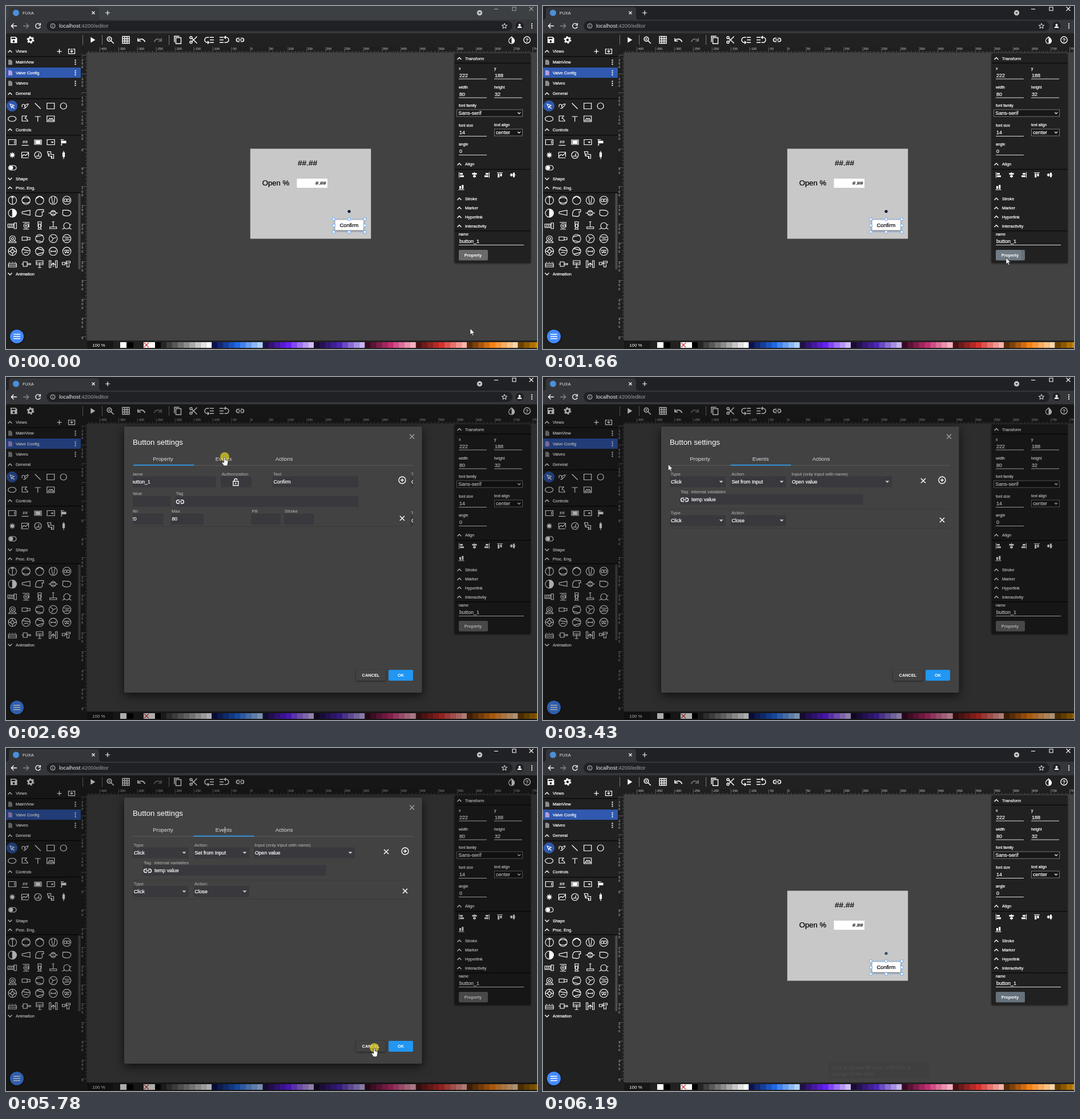
An HTML page for the animation above (6520 ms loop, 930 by 602 pixels).

```html
<!DOCTYPE html>
<html lang="en">
<head>
<meta charset="utf-8">
<title>Editor walkthrough</title>
<style>
html, body { margin: 0; width: 100%; height: 100%; overflow: hidden; background: #424242; }
svg { display: block; width: 930px; height: 602px; font-family: "Liberation Sans", Arial, sans-serif; }
text { white-space: pre; }
#dialog { transform-origin: 467px 320px; }
.raised { filter: drop-shadow(0 1px 1.5px #0008); }
.floating { filter: drop-shadow(0 5px 9px #000a); }
</style>
</head>
<body>
<svg id="stage" viewBox="0 0 930 602"></svg>
<script>
const LOOP = 6520;

// ---- drawing helpers, all return markup ----
const rect = (x, y, w, h, fill, more = '') => `<rect x="${x}" y="${y}" width="${w}" height="${h}" fill="${fill}" ${more}/>`;
const disc = (x, y, r, fill, more = '') => `<circle cx="${x}" cy="${y}" r="${r}" fill="${fill}" ${more}/>`;
const text = (x, mid, str, size = 7.4, fill = '#fff', more = '') =>
  `<text x="${x}" y="${mid + size * .36}" font-size="${size}" fill="${fill}" ${more}>${str}</text>`;
const strong = (x, mid, str, size = 7.4, fill = '#fff') =>
  text(x, mid, str, size, fill, `stroke="${fill}" stroke-width=".22"`);
const bold = (x, mid, str, size = 7.3) => text(x, mid, str, size, '#fff', 'font-weight="bold" text-anchor="middle"');
const icon = (x, y, d, width = 1.1, color = '#fff', fill = 'none') =>
  `<path transform="translate(${x} ${y})" d="${d}" stroke="${color}" stroke-width="${width}" fill="${fill}"/>`;
const solid = (x, y, d, color = '#fff') => icon(x, y, d, 0, color, color);
const turned = (x, y, how, body) => `<g transform="translate(${x} ${y}) ${how}">${body}</g>`;
const ring = r => `M${-r} 0a${r} ${r} 0 1 1 ${2 * r} 0a${r} ${r} 0 1 1 ${-2 * r} 0z`;
const hline = (x1, x2, y, color = '#ddd', h = 1) => rect(x1, y, x2 - x1, h, color);
const group = (id, body, more = '') => `<g id="${id}" ${more}>${body}</g>`;

const UP = 'M-3.5 2L0-1.5L3.5 2', DOWN = 'M-3.5-1.5L0 2L3.5-1.5';
const CROSS = 'M-4-4L4 4M4-4L-4 4', PLUS = 'M-4 0h8M0-4v8';
const LINK = 'M-1-3h-2.5a3 3 0 0 0 0 6h2.5M1-3h2.5a3 3 0 0 1 0 6h-2.5M-3 0h6';
const DOTS = 'M-1-4.5h2v2h-2zM-1-1h2v2h-2zM-1 2.5h2v2h-2z';
const CARET = 'M-3.5-1.7h7l-3.5 3.5z';

function browser() {
  let s = rect(0, 0, 930, 48, '#35363a') + rect(0, 0, 930, 24, '#202124', 'id="tabStrip"')
    + '<path d="M0 24q5 0 5-5v-12q0-5 5-5h148q5 0 5 5v12q0 5 5 5z" fill="#35363a"/>'
    + disc(17.5, 12, 5.5, '#4a90d9') + text(29, 12, 'FUXA', 7.4, '#e8eaed')
    + icon(153, 12, 'M-2.5-2.5l5 5M2.5-2.5l-5 5') + icon(178, 12, PLUS)
    + disc(829.5, 12, 4.7, '#c4c4c4') + solid(829.5, 12, 'M-2.2-1h4.4l-2.2 2.6z', '#202124');
  s += group('winButtons', icon(858.5, 5.5, 'M-3.5 0h7') + icon(890, 5, 'M-3-3h6v6h-6z') + icon(920, 5, 'M-3.5-3.5l7 7M3.5-3.5l-7 7'));
  s += icon(14, 35, 'M5 0H-4.5M-.5-4.2L-4.7 0L-.5 4.2', 1.3) + icon(35, 35, 'M-5 0H4.5M.5-4.2L4.7 0L.5 4.2', 1.3, '#85868a')
    + icon(56, 35, 'M3.5-2.8A4.3 4.3 0 1 0 4.3 1M4.3-5v3.6H.8', 1.3)
    + rect(71, 26, 816, 18, '#202124', 'rx="9"')
    + icon(82, 35, ring(4) + 'M0-2.2v1M0-.5v2.8', 1, '#ccc')
    + text(93, 35, 'localhost<tspan fill="#9aa0a6">:4200/editor</tspan>', 9.4, '#e8eaed')
    + icon(873, 35, 'M0-4.5L1.3-1.4L4.6-1.2L2 .9L2.9 4.2L0 2.3L-2.9 4.2L-2 .9L-4.6-1.2L-1.3-1.4z', .9)
    + disc(899.5, 35, 7, '#1d1e20') + disc(899.5, 33.2, 2, '#fff') + solid(899.5, 37, 'M-4 1.5q0-3 4-3t4 3z')
    + solid(921, 35, DOTS);
  return s;
}

function toolbar() {
  let s = rect(0, 48, 930, 24, '#212121');
  for (const x of [134, 168, 285]) s += rect(x, 51, 1, 17, '#777');
  s += solid(13.5, 59.5, 'M-5.5-5.5h9l2.5 2.5v8.5h-11.5z') + rect(9.5, 55.5, 7, 2.6, '#212121') + disc(13.5, 62, 1.9, '#212121')
    + disc(43, 59.5, 3.6, 'none', 'stroke="#fff" stroke-width="2.7"')
    + disc(43, 59.5, 5.6, 'none', 'stroke="#fff" stroke-width="1.8" stroke-dasharray="2.9 2.96"')
    + solid(152, 59.5, 'M-3.7-5L4.3 0L-3.7 5z')
    + icon(181, 58, ring(3.8) + 'M2.8 2.8l5 5', 1.6) + icon(181, 58, 'M-2 0h4M0-2v4', .9)
    + icon(210, 59.5, 'M-6-6h12v12h-12zM-2-6v12M2-6v12M-6-2h12M-6 2h12', 1.4);
  const undo = 'M6.5 3.5C4-2.5-2-2.5-5 .5M-6-3v5h5.3';
  const reorder = 'M1.5-4.5h7M1.5 0h7M1.5 4.5h7M0-4.5h-3a4.4 4.4 0 0 0 0 9h2M-2.5 2l2.5 2.5l-2.5 2.5';
  s += icon(237, 59.5, undo, 1.7) + turned(266, 59.5, 'scale(-1 1)', icon(0, 0, undo, 1.7, '#777'))
    + icon(301, 59.5, 'M-6 4v-10.5h8.5M-3.5-4h9v10.5h-9z', 1.4)
    + icon(328.5, 59.5, 'M-3.5-3.5L6 6M-3.5 3.5L6-6M-6.5-4a2 2 0 1 0 4 0a2 2 0 1 0-4 0M-6.5 4a2 2 0 1 0 4 0a2 2 0 1 0-4 0', 1.5)
    + icon(355.5, 59.5, reorder, 1.5) + turned(382.5, 59.5, 'rotate(180)', icon(0, 0, reorder, 1.5))
    + icon(410, 59.5, LINK, 1.6)
    + icon(885.5, 60, 'M0-6L4-2a5 5 0 1 1-8 0z', 1.2) + solid(885.5, 60, 'M0-6L4-2a5 5 0 0 1-4 8z')
    + icon(912.5, 59.5, ring(5.7), 1.4) + bold(912.5, 59.7, '?', 9);
  return s;
}

function heading(x, y, str, open = true) {
  return icon(x, y, open ? UP : DOWN, 1.4) + strong(x + 10, y, str);
}

function sidebar() {
  let s = rect(0, 71, 131, 531, '#212121');
  for (const y of [88, 162, 226, 327]) s += hline(0, 131, y, '#080808', 1.3);
  s += rect(0, 108, 131, 18, '#3059af');
  ['MainView', 'Valve Config', 'Valves'].forEach((name, i) => {
    const y = 98.7 + i * 18.5;
    s += solid(7.5, y, 'M-3.5-4.5h4.5l2.5 2.5v6.5h-7z', i == 1 ? '#b39ddb' : '#8d8d8d')
      + strong(17, y, name) + solid(121.5, y, DOTS);
  });
  s += heading(7, 79.6, 'Views') + heading(7, 153.7, 'General') + heading(7, 217, 'Controls')
    + heading(7, 303, 'Shape', false) + heading(7, 319, 'Proc. Eng.') + heading(7, 470, 'Animation', false)
    + icon(93.5, 79.6, PLUS, 1.3) + icon(115, 79.6, 'M-2-4h-3.5v8h11v-8h-3.5M0-5v6M-2.5-1l2.5 2.5l2.5-2.5', 1.2)
    + disc(10.5, 175.5, 9.7, '#3059af');

  const general = ['M-3.5-3.5l7 2.5l-3 1.2l-1.3 3zM0 .5l4 4', 'M-5 2q-1-5 2-5t3 4t4-1t-1-3t-3 5t-3 2',
    'M-5-5L5 5', 'M-6.5-5h13v10h-13z', ring(5.5),
    'M-7 0a7 4.5 0 1 0 14 0a7 4.5 0 1 0-14 0', 'M-5-5h8l-3 4q4 1 5 5h-10z',
    'M-5-4h10M0-4v9', 'M-6.5-5h13v10h-13zM-4.5 3l3-4l2 2l2-2l2.5 4z'];
  general.forEach((d, i) => s += icon(10.7 + i % 5 * 22.5, i < 5 ? 175.5 : 198, d, 1.2));

  const controls = ['M-6.5-4.5h13v9h-13zM4-3v6', 'M-6 5.5h12', 'M-6-4h12v8h-12zM-4-2.5h8v5h-8z', 'M-6.5-4.5h13v9h-13z',
    'M-5.5-4.5h6M-3.5-4.5v9M-5.5 5h3', ring(2.5) + 'M0-5v2M0 3v2M-5 0h2M3 0h2M-3.5-3.5l1.5 1.5M3.5 3.5l-1.5-1.5M3.5-3.5l-1.5 1.5M-3.5 3.5l1.5-1.5',
    'M-6-5v10h12M-6 3l4-4l3 2l5-5M-6-5h12v8', ring(6) + 'M0 2l2-5M-4 2h8', 'M-6-6h6v5h5v7h-4v-4h-5zM-3-3v4M2 2v3',
    'M0-7v3M0 3v4M-1.5-4h3v7h-3z', 'M-2.5-4h5.5a4 4 0 0 1 0 8h-5.5a4 4 0 0 1 0-8z'];
  controls.forEach((d, i) => s += icon(11 + i % 5 * 22.5, 239 + Math.floor(i / 5) * 22.5, d, 1.2));
  s += bold(33.5, 238.5, '##', 8) + solid(56, 239, 'M-3.5-2h7v4h-7z') + solid(78.5, 239, 'M0-1h5l-2.5 3z')
    + solid(100.5, 239, 'M-4-2.5h9v4.5h-9z') + disc(11, 261.5, 2.5, '#fff') + solid(101, 261.5, 'M-2-4h4v7h-4z') + disc(9, 284, 3.4, '#fff');

  const O = ring(7.2), o = ring(3);
  const process = [O + 'M0-7v14M-2.5-4L0-7l2.5 3', O + 'M-6-3q6-4 12 0M-6 3q6 4 12 0', O + 'M-6-3l6-4l6 4', O + 'M-3-6l2 12M3-6l-2 12',
    O + 'M-5 0a2.5 2.5 0 1 0 5 0a2.5 2.5 0 1 0 5 0a2.5 2.5 0 1 0-5 0a2.5 2.5 0 1 0-5 0',
    O + 'M0-7v14', 'M-7-2l14-3v9l-14-3z', 'M-7 5q-1-11 6-11h8v4h-3q3 8-4 8z', ring(4.5) + 'M-8 0h3.5M4.5 0h3.5M-3-2h6M-3 2h6', 'M-7-5h8q8 1 6 6t-9 4t-5-6z',
    'M-8-3h11v6h-11zM3-5h4v10h-4zM-6 3l2-6M-3 3l2-6M0 3l2-6', 'M-6-6h12M-5 6h10M5-5v8' + ring(4) + ring(1.5), 'M-3-7h6v4h-6zM-4 6h8M-2-3v9M2-3v9' + o, 'M0-7v9M-2-7h4M-6 2h12v3h-12z', ring(5.5) + 'M-8 6l4-2M8 6l-4-2M5-2h3',
    ring(5) + ring(2) + 'M-7 7l4-4M7 7l-4-4M-7 7h14', 'M-7-3h9v6h-9zM2-2h5v4h-5z', O + 'M-6-3l12-3M-6 3l12 3', O + 'M-4-4l4 4l5-2M0 0l-3 5', O + 'M-6-3l12 1M-6 3l12-1M-3 0h6',
    O + o + 'M0-7v4M0 3v4M-7 0h4M3 0h4', O + 'M-6-3l12 2M-4 3q4-3 8 0', O + 'M-5-5l11 3M-5 5l11-3', O + 'M-4 0h8M-4-2v4M4-2v4', O + 'M-5-2h10M-4 0l2 3l2-3l2 3l2-3',
    'M-7-1h14v6h-14zM-6-3h2M-1-3h2M4-3h2M-7 2h14', 'M-8 0h3M-5-4h7v8h-7zM2-1h6v2h-6', 'M-6-6h12v7h-12zM-6-2h12M0-2v8M-3 6h6', 'M-7-6v12h3v-12zM7-6v12h-3v-12zM-4 2l4-4l4 4M0-2v7', 'M-8-3h5v4h-5zM-1-5h7v3h-7zM0-2v7h4v-5M-3-1h3'];
  process.forEach((d, i) => s += icon(11.3 + i % 5 * 23.8, 341 + Math.floor(i / 5) * 22.4, d, 1.1));
  s += solid(11.3, 363.4, 'M0-7a7 7 0 0 1 0 14z') + rect(126.5, 329, 4, 133, '#4b4b4b');
  return s + disc(19, 580, 12, '#448aff', 'class="raised"') + icon(19, 580, 'M-6-3.7h12M-6 0h12M-6 3.7h12', 1.4);
}

function rulers() {
  const unit = .6594;
  let s = rect(131, 71, 799, 11, '#1f1f1f') + rect(131, 71, 11, 516, '#1f1f1f'), ticks = '';
  for (let v = -430; v <= 760; v += 5) {
    const x = 428 + v * unit, h = v % 50 ? (v % 10 ? 1.5 : 3) : 10;
    ticks += `M${x} 82v${-h}`;
    if (v % 50 == 0) s += text(x + 1, 75, v, 5.5, '#d5d5d5');
  }
  for (let v = -255; v <= 508; v += 5) {
    const y = 251 + v * unit, w = v % 50 ? (v % 10 ? 1.5 : 3) : 10;
    ticks += `M142 ${y}h${-w}`;
    if (v % 50 == 0) [...String(v)].forEach((c, i) => s += text(132.3, y + 2.4 + i * 6.2, c, 5.5, '#d5d5d5'));
  }
  return s + `<path d="${ticks}" stroke="#8d8d8d" stroke-width=".6"/>`;
}

function palette() {
  let s = rect(131, 587, 799, 15, '#212121') + rect(142, 588, 46, 14, '#171717') + text(151, 595, '100 %', 8)
    + rect(200, 590, 11, 10, '#fff') + rect(211.5, 590, 11.5, 10, '#000')
    + rect(241, 590, 20, 10, '#fff') + icon(246, 595, CROSS, 1.2, '#d32f2f') + rect(261, 590, 10, 10, '#000');
  const ramps = [['262626', '8c8c8c', 'ffffff'], ['0c1250', '1f68e6', 'add2ff'], ['201048', '681fff', 'd2bcf8'], ['180c30', '4d25b8', 'c4b4f4'],
    ['3a0a20', 'c42c72', 'f6b0c0'], ['4a1214', 'd8302c', 'ffb4ac'], ['5a2c08', 'f58212', 'ffd6a8'], ['6b4000', 'f0a000', 'ffe0a0']];
  const mix = (a, b, k) => '#' + [0, 2, 4].map(i => {
    const p = parseInt(a.substr(i, 2), 16), q = parseInt(b.substr(i, 2), 16);
    return Math.round(p + (q - p) * k).toString(16).padStart(2, '0');
  }).join('');
  ramps.forEach(([dark, mid, light], g) => {
    for (let i = 0; i < 9; i++)
      s += rect(271 + (g * 9 + i) * 9.93, 590, 10, 10, i < 5 ? mix(dark, mid, i / 4) : mix(mid, light, (i - 4) / 4));
  });
  return s;
}

function view() {
  let s = rect(427.8, 250.5, 211.4, 158, '#c8c8c8') + strong(511, 275.5, '##.##', 13.6, '#000') + strong(448.7, 310.3, 'Open %', 13.2, '#000')
    + rect(509.5, 303, 53.5, 16, '#fff') + strong(542, 310.5, '#.##', 9.6, '#000')
    + rect(576.5, 375.5, 49.5, 18, '#fff', 'rx="1.5" class="raised"') + strong(584.5, 384.5, 'Confirm', 9.4, '#000')
    + rect(574, 374, 54.5, 22.5, 'none', 'stroke="#7fb0f0" stroke-width="1" stroke-dasharray="2.5 1.5"');
  for (const x of [574, 601, 628.5]) for (const y of [374, 385.2, 396.5])
    if (x != 601 || y != 385.2) s += disc(x, y, 2.4, '#fff', 'stroke="#7ab2f8" stroke-width="1.1"');
  return s + disc(601, 360.5, 2.6, '#0b1c36', 'id="rotor"');
}

function inspector() {
  const field = (x, y, label, value, right = x + 49) =>
    strong(x, y - 12, label, 6.8) + strong(x + 1, y, value, 9) + hline(x, right, y + 6);
  const select = (x, y, w, value) => rect(x, y - 6, w, 12, '#171717', 'stroke="#8b8b8b" stroke-width=".8"')
    + strong(x + 2.5, y, value, 9) + icon(x + w - 6, y, 'M-2.5-1.3L0 1.2L2.5-1.3', 1.2);
  let s = rect(785.5, 83, 133.5, 368, '#212121', 'rx="2" class="raised"');
  for (const y of [99.5, 286, 394]) s += hline(786, 919, y, '#080808', 1.2);
  const rows = { Transform: 92, Align: 277.5, Stroke: 338.5, Marker: 354.5, Hyperlink: 370, Interactivity: 386 };
  for (const name in rows) s += heading(794, rows[name], name);
  s += field(793, 121.5, 'x', '222') + field(855, 121.5, 'y', '188') + field(793, 154.5, 'width', '80') + field(855, 154.5, 'height', '32')
    + field(793, 222, 'font size', '14') + field(793, 255, 'angle', '0') + field(793, 413, 'name', 'button_1', 907)
    + strong(793, 175, 'font family', 6.8) + select(789.7, 188, 115, 'Sans-serif')
    + strong(855, 209, 'text align', 6.8) + select(855.5, 222, 49, 'center');
  const left = solid(0, 0, 'M-4.5-5v10h1v-10zM-2.5-3.5h5v3h-5zM-2.5 .8h7v3h-7z');
  const mid = solid(0, 0, 'M-.5-5h1v10h-1zM-4-3.5h8v3h-8zM-2.5 .8h5v3h-5z');
  s += turned(797.5, 296.5, '', left) + turned(820.5, 296.5, '', mid) + turned(842.5, 296.5, 'scale(-1 1)', left)
    + turned(865, 296.5, 'rotate(90)', left) + turned(887.5, 296.5, 'rotate(90)', mid) + turned(797.5, 318.5, 'rotate(-90)', left);
  return s + rect(793, 428, 51, 18.5, '#6a6a6a', 'id="propButton" rx="2"')
    + `<g clip-path="url(#propClip)">${disc(811, 440, 0, '#fff', 'id="ripple" opacity=".08"')}</g>` + bold(818, 437.5, 'Property', 7.4);
}

const GRAY = '#b8b8b8', FIELD = '#38383d';
const input = (x, y, w, label, value = '') =>
  text(x + 1, y - 14, label, 8, GRAY) + rect(x, y - 9.5, w, 19, FIELD) + strong(x + 1.5, y - .5, value, 8.7);
const dropdown = (x, y, w, label, value) => input(x, y, w, label, value) + solid(x + w - 8, y, CARET, '#ccc');
const addButton = icon(699, 181, ring(6) + 'M-3 0h6M0-3v6', 1.4);

function propertyTab() {
  return input(222.5, 184, 150, 'Name', 'button_1') + input(381.5, 184, 53.5, 'Authorization') + input(472, 184, 150, 'Text', 'Confirm')
    + icon(407.5, 185, 'M-4.5-2h9v7.5h-9zM-2.5-2v-2a2.5 2.5 0 0 1 5 0', 1.4) + disc(407.5, 186.7, 1.2, '#fff')
    + input(222.5, 218.5, 71, 'Value') + input(301.5, 218.5, 320.5, 'Tag') + icon(310, 219, LINK, 1.4)
    + input(222.5, 249.5, 58, 'Min', '20') + input(294, 249.5, 57, 'Max', '80') + input(434.5, 249.5, 51.5, 'Fill') + input(492, 249.5, 52, 'Stroke')
    + hline(222, 713, 262, '#3a3a3a') + icon(699, 248, CROSS, 1.5) + addButton;
}

function eventsTab() {
  return dropdown(222.5, 184, 97.5, 'Type', 'Click') + dropdown(329, 184, 97, 'Action', 'Set from Input')
    + dropdown(434.5, 184, 176.5, 'Input (only input with name)', 'Open value')
    + icon(666, 182, CROSS, 1.5) + addButton
    + text(241, 201, 'Tag', 8, GRAY) + text(259.5, 201, 'internal variables', 8, GRAY) + rect(240, 205.5, 320.5, 18.5, FIELD)
    + icon(248, 215.5, LINK, 1.4) + strong(260, 214.5, 'temp value', 8.7)
    + hline(222, 713, 231.5, '#3a3a3a') + dropdown(222.5, 252, 97.5, 'Type', 'Click') + dropdown(329, 252, 97, 'Action', 'Close')
    + icon(699, 251, CROSS, 1.5) + hline(222, 713, 265, '#3a3a3a');
}

function dialog() {
  const tab = (x, name) => text(x, 144, name, 9.4, '#dcdcdc', 'text-anchor="middle"');
  return rect(207, 87, 521.5, 467, '#424242', 'rx="2" class="floating"')
    + text(222, 114, 'Button settings', 13.3) + icon(711, 104.5, CROSS, 1.3, '#a5a5a5')
    + tab(275, 'Property') + tab(381, 'Events') + tab(487, 'Actions')
    + hline(222, 713, 154.7, '#5c5c5c') + rect(222.5, 153.7, 106, 1.8, '#2f9ae8', 'id="inkBar"') + rect(383, 138.5, 1, 11, '#ddd', 'id="caret"')
    + `<g clip-path="url(#tabClip)">${group('propTab', propertyTab())}${group('eventTab', eventsTab())}</g>`
    + rect(613, 514, 52, 19, '#424242', 'rx="2" class="raised"') + bold(639, 523.5, 'CANCEL', 7.4)
    + rect(670, 514, 43, 19, '#2196f3', 'id="okButton" rx="2"') + bold(691.5, 523.5, 'OK', 7.4);
}

const pointer = group('arrow', '<path d="M0 0v11l2.6-2.4l1.8 4l1.7-.8l-1.8-3.8h3.4z" fill="#fff" stroke="#111" stroke-width=".6"/>')
  + group('hand', '<path d="M-1.3 1.5q1.3-1.8 2.4 0v4.2l4 .9q1.2.4 1 2l-1 5.4q-.3 2-2 2h-3.2q-1.3 0-2.2-1.6l-2.8-4.2q.4-2 3.8.2z" fill="#fff" stroke="#111" stroke-width=".7"/>');

const stage = document.getElementById('stage');
stage.innerHTML = `<defs><clipPath id="tabClip">${rect(222, 158, 491, 340, '#000')}</clipPath>
  <clipPath id="propClip">${rect(793, 428, 51, 18.5, '#000', 'rx="2"')}</clipPath></defs>`
  + rect(131, 71, 799, 531, '#424242') + view() + rulers() + toolbar() + sidebar() + palette() + inspector()
  + group('tooltip', rect(500, 551, 176, 29, '#3f3f3f', 'rx="2"')
    + text(505, 561, 'Click to change fill color, shift-click to', 8.6, '#4f4f4f') + text(505, 571.5, 'change stroke color', 8.6, '#4f4f4f'))
  + rect(0, 48, 930, 554, '#000', 'id="backdrop"') + browser() + group('dialog', dialog())
  + disc(0, 0, 8, '#e0d020', 'id="halo" opacity=".72"') + group('pointer', pointer);

// ---- motion ----
const el = {};
stage.querySelectorAll('[id]').forEach(node => el[node.id] = node);
const set = (id, name, value) => el[id].setAttribute(name, value);
const show = (id, on) => el[id].style.display = on ? '' : 'none';
const ramp = (t, from, to) => Math.min(1, Math.max(0, (t - from) / (to - from)));
const ease = k => k * k * (3 - 2 * k);
const within = (t, spans) => spans.some(([a, b]) => t >= a && t < b);

const bursts = [[100, 300, 3], [440, 830, 5], [1060, 1140, 2], [1280, 1860, 7], [1960, 2400, 5], [2610, 3230, 7],
  [3320, 3950, 7], [4040, 4660, 7], [4760, 4990, 3], [5180, 5780, 7], [5880, 6190, 4]];
const refreshes = bursts.flatMap(([a, b, n]) => Array.from({ length: n }, (_, i) => Math.floor((a + (b - a) * i / (n - 1)) / 10) * 10));

// Mouse way points: time, x, y.
const way = [[0, 813, 566], [300, 695, 455], [440, 688, 449], [830, 615, 387], [1180, 615, 387], [1560, 811, 442], [1860, 811, 442],
  [2080, 581, 295], [2400, 383, 140], [2720, 383, 140], [3230, 226, 160], [3430, 219, 153], [3740, 207, 185], [3950, 214, 214],
  [4150, 203, 240], [4350, 300, 304], [4660, 581, 298], [4760, 621, 288], [4990, 615, 272], [5180, 620, 290],
  [5580, 687, 515], [5780, 645, 526], [5880, 640, 535], [6090, 590, 588], [6190, 580, 630], [LOOP, 580, 630]];

function mouseAt(t) {
  const i = Math.max(1, way.findIndex(p => p[0] >= t));
  const [a, ax, ay] = way[i - 1], [b, bx, by] = way[i], k = ramp(t, a, b);
  return [ax + (bx - ax) * k, ay + (by - ay) * k];
}

function draw(now) {
  const clock = now % LOOP;
  const t = refreshes.reduce((last, r) => r <= clock ? r : last, 0);
  const [x, y] = mouseAt(t);
  const hand = within(t, [[2390, 2800], [5570, 5880]]);
  set('pointer', 'transform', `translate(${x} ${y})`);
  show('arrow', !hand);
  show('hand', hand);
  set('halo', 'transform', `translate(${x} ${y})`);
  show('halo', within(t, [[1060, 1140], [1560, 1640], [2610, 2710], [5780, 5880]]));

  const active = t >= 1060;
  set('tabStrip', 'fill', active ? '#202124' : '#3c4043');
  set('winButtons', 'opacity', active ? 1 : .5);
  const focused = within(t, [[1560, 1800], [5880, LOOP]]);
  set('propButton', 'fill', focused ? '#65717b' : '#6a6a6a');
  set('ripple', 'r', within(t, [[1560, 1800]]) ? (t - 1550) / 4 : 0);
  set('rotor', 'fill', t >= 6190 ? '#33506b' : '#0b1c36');
  show('tooltip', t >= 6190);

  const enter = ease(ramp(t, 1700, 1900)), leave = ramp(t, 5820, 5960);
  set('backdrop', 'opacity', .32 * ease(ramp(t, 1690, 2040)) * (1 - ease(ramp(t, 5800, 6180))));
  set('dialog', 'opacity', enter * (1 - leave));
  el.dialog.style.transform = `scale(${.7 + .3 * enter})`;

  const slide = ease(ramp(t, 2580, 3080));
  set('inkBar', 'x', 222.5 + 106 * slide);
  set('propTab', 'transform', `translate(${-491 * slide} 0)`);
  set('eventTab', 'transform', `translate(${491 * (1 - slide)} 0)`);
  set('okButton', 'fill', t < 2610 ? '#3fa4f5' : '#2196f3');
  show('caret', within(t, [[2610, 3130], [3700, 4230], [4750, 5270], [5780, 6200]]));
}

const start = performance.now();
(function loop() {
  draw(performance.now() - start);
  requestAnimationFrame(loop);
})();
</script>
</body>
</html>
```
